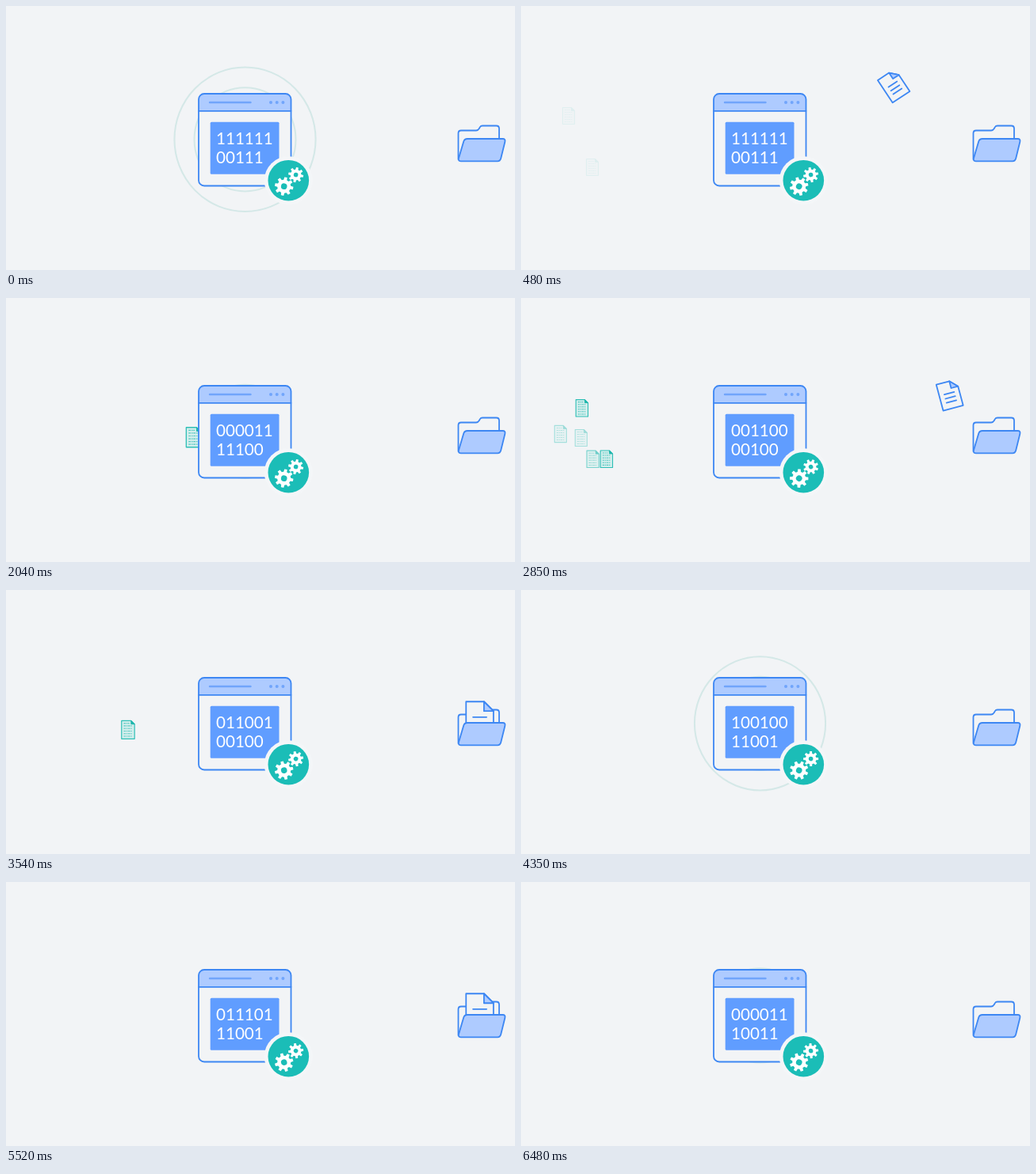
Write an HTML page that moves like this. It is 642 by 334 pixels and loops after 6510 ms.

```html
<!DOCTYPE html>
<html lang="en">
<head>
<meta charset="utf-8">
<title>File processing</title>
<style>
html, body { margin: 0; width: 100%; height: 100%; overflow: hidden; background: #f2f4f6; }
svg { display: block; width: 642px; height: 334px; }
text { font: 20.6px Lato, sans-serif; fill: #fff; }
.line { fill: none; stroke: #3d87f3; stroke-width: 1.8; stroke-linejoin: round; stroke-linecap: round; }
.line * { vector-effect: non-scaling-stroke; }
</style>
</head>
<body>
<svg viewBox="0 0 642 334">
  <defs>
    <clipPath id="pocket"><rect width="642" height="194"/></clipPath>
    <g id="scan">
      <path d="M-7.5-10.5H3.5L7.5-6.5V10.5H-7.5Z" fill="#d3eeec" stroke="#2fbfb6" stroke-width="1.1" stroke-linejoin="round"/>
      <path d="M3.5-10.5V-6.5H7.5Z" fill="#1cb5ac" stroke="#1cb5ac" stroke-width=".8"/>
      <path d="M-5-7.5H1.5M-5-4.5H5M-5-1.5H5M-5 1.5H5M-5 4.5H5M-5 7.5H5" stroke="#59c9c2" stroke-width="1" stroke-dasharray="2.4 .7 1.3 .6"/>
    </g>
  </defs>
  <rect width="642" height="334" fill="#f2f4f6"/>
  <g id="rings" fill="none" stroke="#1f9d8e" stroke-width="2"></g>
  <g id="scans"></g>

  <path class="line" d="M570.5 194V161Q570.5 157.5 574 157.5H593Q595.5 157.5 596.7 155.2L597.7 153.4Q598.8 151.5 601 151.5H618.5Q622 151.5 622 155V168"/>
  <g clip-path="url(#pocket)">
    <g id="page" class="line">
      <path d="M-13-17H4L13-8V17H-13Z" fill="#f2f4f6"/>
      <path d="M4-17V-8H13Z" fill="#aecbff"/>
      <path d="M-6.4-2.3H6.4M-6.4 3.2H6.4M-6.4 8.5H6.4"/>
    </g>
  </g>
  <path class="line" style="fill:#aecbff" d="M582 168H626.5Q630.3 168 629.3 172L624.2 192.8Q623.3 196.3 620 196.3H573.5Q570 196.3 571 192.5L577.2 171.5Q578.3 168 582 168Z"/>

  <rect x="243" y="111" width="116.5" height="116.5" rx="7" fill="#f2f4f6"/>
  <path d="M243 133V118Q243 111 250 111H352.5Q359.5 111 359.5 118V133Z" fill="#aecbff"/>
  <path class="line" d="M243 132.8H359.5"/>
  <rect class="line" x="243" y="111" width="116.5" height="116.5" rx="7"/>
  <path d="M257 122H308.5" stroke="#71a5fb" stroke-width="2.4" stroke-linecap="round"/>
  <g fill="#71a5fb"><circle cx="334" cy="122" r="2"/><circle cx="341.7" cy="122" r="2"/><circle cx="349.4" cy="122" r="2"/></g>
  <rect x="257.7" y="146.8" width="86.8" height="66" rx="1.5" fill="#609dff"/>
  <text id="top" x="265" y="175.3"></text>
  <text id="bottom" x="265" y="198.5"></text>

  <circle cx="356.3" cy="220.7" r="30.5" fill="#f4f6f8"/>
  <circle cx="356.3" cy="220.7" r="25.8" fill="#1bbdb7"/>
  <g id="gears" fill="#fff" fill-rule="evenodd"></g>
</svg>
<script>
const LOOP = 6510;
const $ = id => document.getElementById(id);
const clamp = v => Math.min(1, Math.max(0, v));
const ease = s => (1 - Math.cos(Math.PI * clamp(s))) / 2;

function add(parent, tag, attrs) {
  const el = document.createElementNS("http://www.w3.org/2000/svg", tag);
  set(el, attrs);
  parent.append(el);
  return el;
}
function set(el, attrs) {
  for (const name in attrs) el.setAttribute(name, attrs[name]);
}

function gearPath(outer, inner, hole, teeth = 8) {
  const points = [];
  for (let i = 0; i < teeth; i++) {
    for (const [offset, r] of [[-.31, inner], [-.19, outer], [.19, outer], [.31, inner]]) {
      const a = (i + offset) / teeth * 2 * Math.PI;
      points.push((r * Math.cos(a)).toFixed(2) + " " + (r * Math.sin(a)).toFixed(2));
    }
  }
  return `M${points.join("L")}ZM${hole} 0A${hole} ${hole} 0 1 0 ${-hole} 0A${hole} ${hole} 0 1 0 ${hole} 0Z`;
}

// Moment each pulse emerges from behind the window
const pulses = [-150, 2040, 4231, 6478];
const rings = pulses.flatMap(start => [0, 120].map(delay => (
  { start: start + delay, el: add($("rings"), "ellipse", { cx: 301.5, cy: 168.8 }) })));

const scanPaths = [
  { x: 60, y: 139, start: 663, span: 900, fade: 450 },
  { x: 42, y: 172, start: 722, span: 900, fade: 690 },
  { x: 75, y: 177, start: 760, span: 1690, fade: 690 },
  { x: 75, y: 204, start: 663, span: 900, fade: 610 },
  { x: 90, y: 204, start: 643, span: 900, fade: 450 }
];
const scans = [0, 2020].flatMap(cycle => scanPaths.map(path => (
  { ...path, cycle, el: add($("scans"), "use", { href: "#scan" }) })));

const gears = [
  { x: 350.7, y: 228.2, speed: .044, el: add($("gears"), "path", { d: gearPath(11.8, 8.5, 3.8) }) },
  { x: 365.6, y: 213.6, speed: -.044, el: add($("gears"), "path", { d: gearPath(9.6, 6.8, 2.8) }) }
];

const topBits = ["111111", "110011", "100111", "001110", "000011", "001100", "011001",
  "110010", "100100", "001110", "011101", "110000", "000011"];
const bottomBits = [[0, "00111"], [700, "11100"], [2400, "00100"], [3600, "11001"], [6000, "10011"]];

function drawRing({ start, el }, t) {
  const r = 57.5 + (t - start) * .209;
  const visible = r > 40 && r < 127;
  set(el, {
    rx: Math.max(0, r), ry: Math.max(0, r * 1.025),
    opacity: visible ? .14 * clamp((132 - r) / 32) : 0
  });
}

function drawScan({ x, y, start, span, fade, cycle, el }, t) {
  const p = t - cycle;
  const e = ease((p - start) / span);
  const px = x + (262 - x) * e;
  const py = y + (176 - y) * e * e;
  set(el, {
    transform: `translate(${px} ${py}) scale(${1 + .22 * e})`,
    opacity: e < 1 ? clamp((p - fade) / 360) : 0
  });
}

function drawPage(p) {
  const flight = Math.min(p, 806);
  const x = 302 + .392 * (flight - 52);
  const u = clamp((p - 1350) / 200);
  const sink = 40 * u * u * (4.5 * u - 3.5);
  const y = 100.5 + 5e-4 * (flight - 450) ** 2 + sink;
  const turn = -15 * (806 - flight) / 146;
  const scale = 1 + .33 * ease((p - 806) / 190);
  set($("page"), {
    transform: `translate(${x} ${y}) rotate(${turn}) scale(${scale})`,
    visibility: p > 60 && u < 1 ? "visible" : "hidden"
  });
}

function draw(t) {
  rings.forEach(ring => drawRing(ring, t));
  scans.forEach(scan => drawScan(scan, t));
  drawPage(t % 2190);
  for (const { x, y, speed, el } of gears) {
    set(el, { transform: `translate(${x} ${y}) rotate(${11 + t * speed})` });
  }
  $("top").textContent = topBits[Math.floor(t / 510)];
  $("bottom").textContent = bottomBits.filter(([from]) => from <= t).pop()[1];
}

const began = performance.now();
function tick() {
  draw((performance.now() - began) % LOOP);
  requestAnimationFrame(tick);
}
tick();
</script>
</body>
</html>
```
